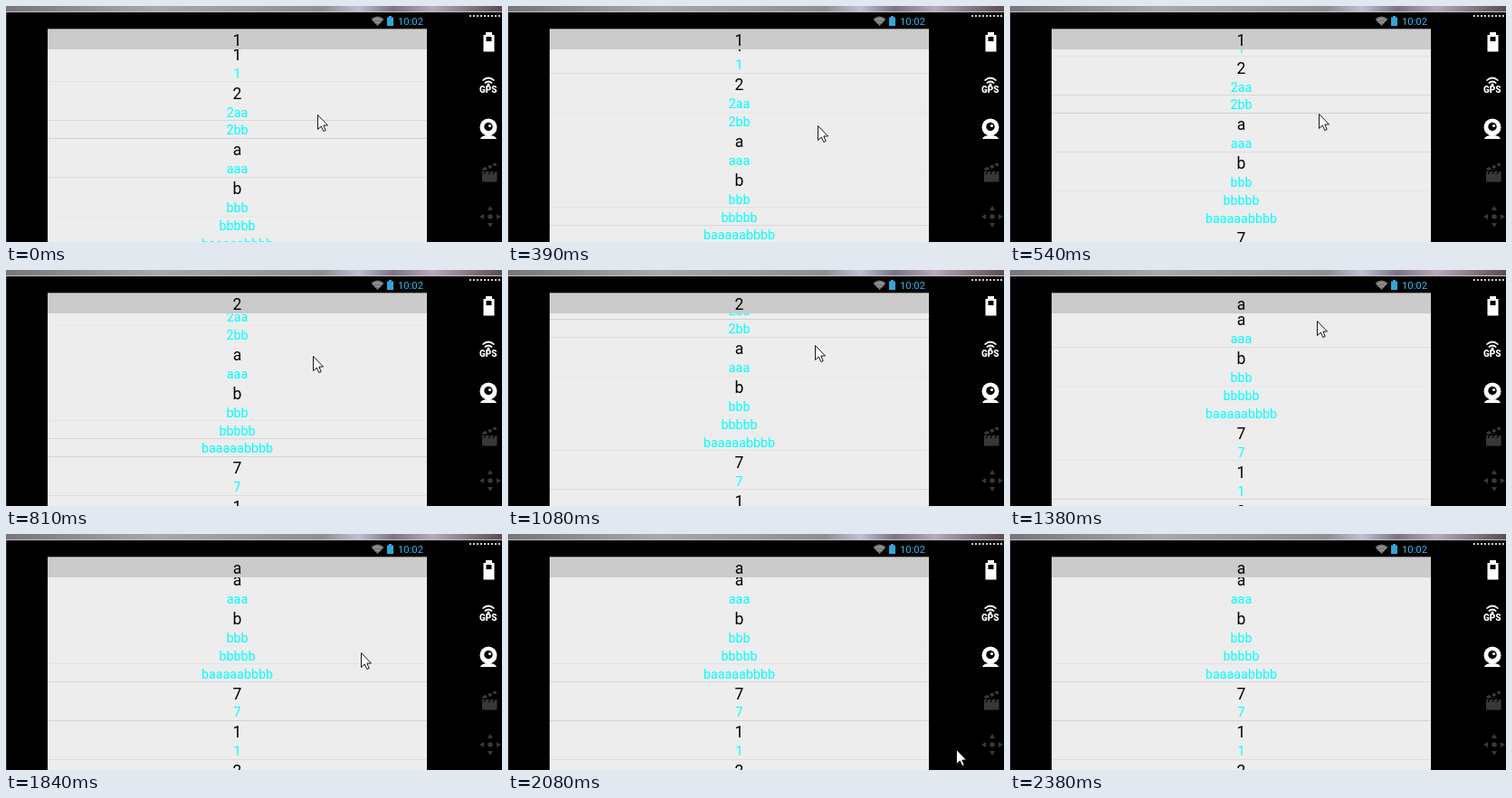
These frames come from a looping animation (548 by 261 pixels, 2.53 s). An HTML page:

```html
<!DOCTYPE html>
<html lang="en">
<head>
<meta charset="utf-8">
<title>Sectioned list</title>
<style>
  html, body { margin: 0; width: 100%; height: 100%; overflow: hidden; background: #000; }
  svg { display: block; width: 548px; height: 261px; }
  text { font-family: Roboto, sans-serif; text-anchor: middle; }
  .head { font-size: 17.5px; fill: #000; }
  .child { font-size: 14.3px; fill: #0ff; }
  .dim { fill: #383838; }
</style>
</head>
<body>
<svg viewBox="0 0 548 261">
  <defs>
    <linearGradient id="desk">
      <stop offset="0" stop-color="#77757a"/>
      <stop offset=".3" stop-color="#aaa8a8"/>
      <stop offset=".64" stop-color="#918e92"/>
      <stop offset=".71" stop-color="#c0bfd6"/>
      <stop offset=".78" stop-color="#7b7482"/>
      <stop offset=".86" stop-color="#b8a9bb"/>
      <stop offset="1" stop-color="#5a4c50"/>
    </linearGradient>
    <clipPath id="listClip"><rect x="46" y="48" width="419" height="213"/></clipPath>
  </defs>
  <rect width="548" height="261"/>
  <rect width="548" height="6" fill="url(#desk)"/>
  <rect y="6" width="548" height="1" fill="#c4c2c8"/>
  <rect y="7" width="1" height="254" fill="#2b2e3a"/>

  <!-- status bar -->
  <path d="M403.5 14.5Q410.5 8.5 417.5 14.5L410.5 22Z" fill="#777"/>
  <path d="M405.5 16.5Q410.5 12 415.5 16.5M407.5 18.7Q410.5 16 413.5 18.7" fill="none" stroke="#aaa"/>
  <path d="M423 11h3v1.5h2V22h-7v-9.5h2z" fill="#33a5d5"/>
  <text x="447" y="21" font-size="11.25" fill="#33b5e5">10:02</text>

  <!-- list -->
  <rect x="46" y="25" width="419" height="236" fill="#ededed"/>
  <g id="list" clip-path="url(#listClip)"></g>
  <rect x="46" y="25" width="419" height="23" fill="#cbcbcb"/>
  <rect x="46" y="25" width="419" height="1" fill="#909090"/>
  <text id="sticky" class="head" x="255.5" y="44"></text>

  <!-- tool column -->
  <rect id="hover" x="511" y="209" width="37" height="52" fill="#1c1c1c"/>
  <path d="M512 11H548" stroke="#ccc" stroke-width="2" stroke-dasharray="2 2"/>
  <path d="M530 29h7v3h2.500v18.500h-12V32H530zM530.500 34v5h6v-5z" fill="#fff" fill-rule="evenodd"/>
  <path d="M526.500 82.500Q533 76.500 539.500 82.500M528.800 85.500Q533 81.500 537.200 85.500" fill="none" stroke="#fff" stroke-width="1.700"/>
  <circle cx="533" cy="87" r="1.600" fill="#fff"/>
  <text x="532.7" y="96" font-size="10" font-weight="900" fill="#fff">GPS</text>
  <g fill="#fff">
    <circle cx="533" cy="134" r="9.500"/>
    <path d="M524 147q1-4 9-4t9 4z"/>
    <circle cx="533" cy="133.500" r="4.700" fill="#000"/>
    <circle cx="534.500" cy="132.500" r="1.600"/>
  </g>
  <g class="dim">
    <path d="M526 183h16.500v11.500H526z"/>
    <path d="M526 179.500l4-1.700 2 3-4.500 1.500zM532 177l3.500-1.500 2 3-3.500 1.500zM537.500 174.700l3.500-1.500 1.500 3-3 1.300z"/>
    <path d="M530 183l-2 3M535 183l-2 3M540 183l-2 3" stroke="#000" stroke-width="1.300"/>
  </g>
  <g class="dim">
    <circle cx="535" cy="233" r="2.800"/>
    <path d="M535 221l3 5h-6zM535 245l3-5h-6zM523 233l5-3v6zM547 233l-5-3v6z"/>
  </g>

  <path id="cursor" d="M.5.5V16.5L4.300 13L6.800 18.500L9.200 17.500L6.800 12H11.500Z" fill="#fff" stroke="#15151f"/>
</svg>
<script>
const LOOP = 2530, CENTER = 255.5, STICKY_BOTTOM = 48;
const TALL = 42 + 6 / 7, SHORT = 19 + 6 / 7, END = 108 + 2 / 7;
const sections = [
  ['1', '1'], ['2', '2aa', '2bb'], ['a', 'aaa'], ['b', 'bbb', 'bbbbb', 'baaaaabbbb'],
  ['7', '7'], ['1', '1'], ['2', '2aa', '2bb']
];
// time, scroll, cursor x, cursor y
const steps = [
  [0, 0, 344, 120], [120, 0, 344, 159], [270, 3, 343, 146], [390, 9 + 3 / 7, 342, 132],
  [540, 28, 341, 119], [660, 48, 340, 106], [810, 65 + 3 / 7, 339, 95],
  [960, 69, 339, 89], [1080, 72 + 1 / 7, 339, 83], [1230, 87, 339, 69],
  [1380, 104, 339, 56], [1530, END, 339, 56], [1840, END, 392, 131],
  [1960, END, 445, 187], [2080, END, 495, 238],
  [2230, END, 531, 244], [2380, END, -40, 0]
];
const byId = id => document.getElementById(id);
const list = byId('list'), sticky = byId('sticky'), cursor = byId('cursor'), hover = byId('hover');

function add(tag, attrs, label = '') {
  const node = document.createElementNS('http://www.w3.org/2000/svg', tag);
  for (const key in attrs) node.setAttribute(key, attrs[key]);
  node.textContent = label;
  return list.appendChild(node);
}

let bottom = 83.6 - TALL;
const rows = sections.flatMap(([title, ...children]) => children.map((label, i) => {
  bottom += i ? SHORT : TALL;
  return {
    title, bottom,
    head: i ? null : add('text', { class: 'head', x: CENTER }, title),
    child: add('text', { class: 'child', x: CENTER }, label),
    line: add('rect', { x: 46, width: 419, height: 1, fill: '#d2d2d2' })
  };
}));

function render([time, scroll, x, y]) {
  for (const row of rows) {
    const edge = row.bottom - scroll, pixel = Math.floor(edge);
    row.head?.setAttribute('y', Math.round(edge - 23.7));
    row.child.setAttribute('y', Math.round(edge - 3.9));
    row.line.setAttribute('y', pixel);
    // downscaled dividers fade as they fall between pixel rows
    row.line.setAttribute('opacity', Math.max(0, 1 - Math.abs(edge - pixel - 0.35) / 0.42));
  }
  sticky.textContent = rows.find(row => row.bottom - scroll > STICKY_BOTTOM).title;
  cursor.setAttribute('transform', `translate(${x} ${y})`);
  hover.setAttribute('visibility', time === 2230 ? 'visible' : 'hidden');
}

let shown;
function tick() {
  const time = performance.now() % LOOP;
  const step = steps.findLast(([start]) => start <= time);
  if (step !== shown) render(shown = step);
  requestAnimationFrame(tick);
}
tick();
</script>
</body>
</html>
```
